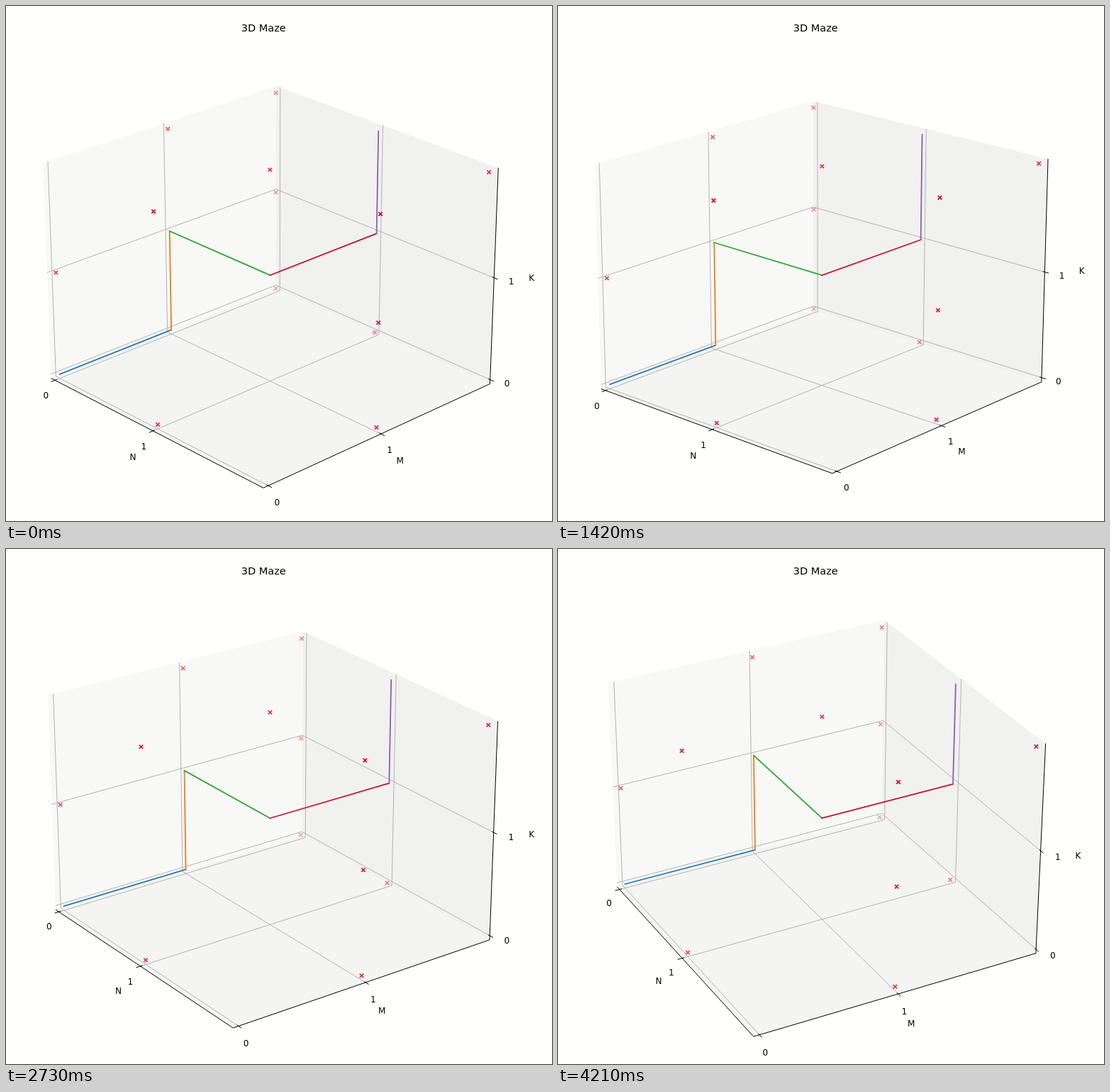
Recreate the animation shown at these times as an HTML page with a canvas. Size 770 px wide and 727 px high, loop 4.3 s.

```html
<!DOCTYPE html>
<html lang="en">
<head>
<meta charset="utf-8">
<title>3D Maze</title>
<style>
  html, body { margin: 0; width: 100%; height: 100%; overflow: hidden; background: #fffffe; }
  canvas { display: block; }
</style>
</head>
<body>
<canvas id="plot" width="770" height="727"></canvas>
<script>
const ctx = document.getElementById('plot').getContext('2d');

const LOOP = 4300;
// Times of the redraws, in hundredths of a second
const STEPS = [
  21, 31, 42, 52, 62, 73, 82, 91, 101, 111, 121, 130, 142, 152,
  162, 172, 181, 191, 200, 212, 221, 232, 242, 252, 261, 271, 281, 291,
  301, 312, 321, 331, 342, 352, 362, 373, 382, 391, 401, 411, 421
];
// Camera drag: step, azimuth, elevation (degrees)
const VIEW = [
  [0, 43.38, 24.5], [3, 44.9, 25.1], [6, 47.2, 25.3], [8, 49.07, 23.9],
  [10, 49.1, 21.4], [12, 48, 19.35], [13, 47.44, 19.23], [18, 43.5, 19.3],
  [20, 41.74, 20.29], [23, 38.94, 22.05], [24, 37.95, 22.8],
  [30, 32.5, 25.88], [36, 29.4, 28.8], [41, 28.04, 29.27]
];

const CX = 372.4, CY = 380, SCALE = 374.6, DIST = 10;
const SIDE = 4 / 7, RISE = 3 / 7;   // half sizes of the box
const E = 1 + 1 / 24;               // padded edge of the panes
const TICKS = [-1, 0];              // values 0 and 1 around the centre

const PANES = [
  ['#f8f8f7', [-E, -E, -E], [-E, E, -E], [-E, E, E], [-E, -E, E]],
  ['#f1f1f0', [-E, E, -E], [E, E, -E], [E, E, E], [-E, E, E]],
  ['#f4f4f3', [-E, -E, -E], [E, -E, -E], [E, E, -E], [-E, E, -E]]
];
const GRID = [
  v => [[v, -E, -E], [v, E, -E], [v, E, E]],
  v => [[E, v, -E], [-E, v, -E], [-E, v, E]],
  v => [[E, E, v], [-E, E, v], [-E, -E, v]]
];
// Side of the box each axis runs along, and the direction of its ticks
const AXES = [
  { name: 'N', side: [0, -1, -1], dir: 1 },
  { name: 'M', side: [1, 0, -1], dir: 0 },
  { name: 'K', side: [1, 1, 0], dir: 0 }
];
const cells = list => list.split(' ').map(c => [...c].map(n => n - 1));
const WALLS = cells('001 012 020 021 022 100 102 112 120 210 211 212 222');
const ROUTE = cells('000 010 011 111 121 122');
const COLORS = ['#2678b2', '#ee7f18', '#2fa62f', '#c4162e', '#8d5eb5'];

let cosA, sinA, cosE, sinE;

function setView([az, el]) {
  const rad = Math.PI / 180;
  cosA = Math.cos(az * rad); sinA = Math.sin(az * rad);
  cosE = Math.cos(el * rad); sinE = Math.sin(el * rad);
}

function depth([x, y, z]) {
  return cosE * SIDE * (x * cosA - y * sinA) + sinE * RISE * z;
}

function project(p) {
  const [x, y, z] = p;
  const k = SCALE / (1 - depth(p) / DIST);
  const right = SIDE * (x * sinA + y * cosA);
  const up = cosE * RISE * z - sinE * SIDE * (x * cosA - y * sinA);
  return [CX + right * k, CY - up * k];
}

function trace(points) {
  ctx.beginPath();
  points.forEach(p => ctx.lineTo(...project(p)));
}

function line(points, color, width) {
  trace(points);
  ctx.strokeStyle = color;
  ctx.lineWidth = width;
  ctx.stroke();
}

function text(str, x, y, size = 12.1) {
  ctx.font = size + 'px "DejaVu Sans", sans-serif';
  ctx.fillStyle = '#000';
  ctx.fillText(str, x, y);
}

function drawAxis({ name, side, dir }, i) {
  const at = (v, out = 0) => side.map((s, j) => j === i ? v : s * (E + out));
  const shifted = (v, out) => {
    const p = at(v);
    p[dir] += side[dir] * out;
    return p;
  };
  line([at(-E), at(E)], '#000', 1);
  TICKS.forEach((v, n) => {
    line([shifted(v, 1 / 30), shifted(v, -1 / 60)], '#000', 1);
    const [x, y] = project(at(v, 0.0802));
    text(n, x, y + 9.3);
  });
  const [x, y] = project(at(0, 0.1744));
  text(name, x, y + 3.6);
}

function drawWalls() {
  const far = WALLS.map(p => -1 / (DIST - depth(p)));
  const min = Math.min(...far), max = Math.max(...far), r = 2.7;
  ctx.strokeStyle = '#dc0620';
  ctx.lineWidth = 1.81;
  WALLS.forEach((p, i) => {
    const [x, y] = project(p);
    ctx.globalAlpha = 1 - 0.7 * (far[i] - min) / (max - min);
    ctx.beginPath();
    ctx.moveTo(x - r, y - r); ctx.lineTo(x + r, y + r);
    ctx.moveTo(x - r, y + r); ctx.lineTo(x + r, y - r);
    ctx.stroke();
  });
  ctx.globalAlpha = 1;
}

// Smooth curve through the camera keys
function viewAt(step) {
  let i = 0;
  while (i < VIEW.length - 2 && step >= VIEW[i + 1][0]) i++;
  const a = VIEW[i], b = VIEW[i + 1], span = b[0] - a[0];
  const u = (step - a[0]) / span;
  const slope = (n, c) => {
    const p = VIEW[Math.max(n - 1, 0)], q = VIEW[Math.min(n + 1, VIEW.length - 1)];
    return (q[c] - p[c]) / (q[0] - p[0]) * span;
  };
  return [1, 2].map(c =>
    a[c] + (b[c] - a[c]) * u * u * (3 - 2 * u) +
    slope(i, c) * u * (1 - u) * (1 - u) - slope(i + 1, c) * u * u * (1 - u));
}

function draw(step) {
  setView(viewAt(step));
  ctx.fillStyle = '#fffffe';
  ctx.fillRect(0, 0, 770, 727);
  ctx.textAlign = 'center';
  ctx.lineCap = 'butt';
  for (const [color, ...corners] of PANES) {
    trace(corners);
    ctx.fillStyle = color;
    ctx.fill();
  }
  GRID.forEach(path => TICKS.forEach(v => line(path(v), '#b0b0b0', 0.97)));
  AXES.forEach(drawAxis);
  drawWalls();
  ctx.lineCap = 'square';
  COLORS.forEach((color, i) => line(ROUTE.slice(i, i + 2), color, 1.81));
  text('3D Maze', 363.2, 36, 14.5);
}

let start, shown = -1;
function tick(now) {
  start ??= now;
  const t = (now - start) % LOOP;
  const step = STEPS.filter(s => s * 10 <= t).length;
  if (step !== shown) draw(shown = step);
  requestAnimationFrame(tick);
}
draw(shown = 0);
requestAnimationFrame(tick);
</script>
</body>
</html>
```
